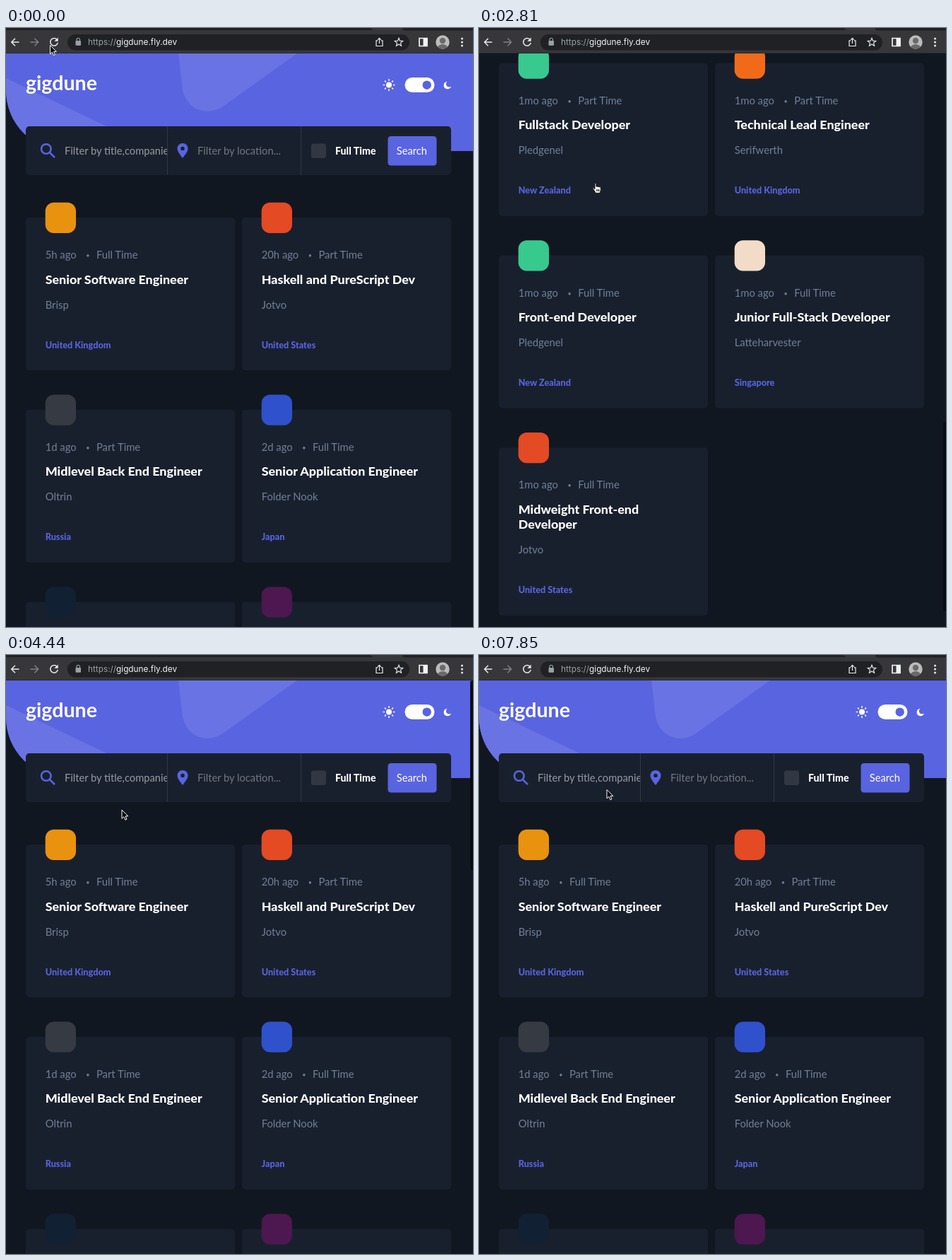
Recreate the animation shown at these times as an HTML page. Size 661x847 px, loop 8 s.

```html
<!DOCTYPE html>
<html lang="en">
<head>
<meta charset="utf-8">
<title>Job board</title>
<style>
  html, body { margin: 0; width: 100%; height: 100%; overflow: hidden; background: #121721; }
  svg { display: block; width: 661px; height: 847px; font-family: Lato, "Open Sans", sans-serif; }
  svg { --bg: #111720; --card: #19202d; --title: #fff; --box: #323843; --hint: #72777f; --typed: #969aa0; }
  svg.light { --bg: #f4f6f8; --card: #fff; --title: #19202d; --box: #e8e9ea; --hint: #8c9096; --typed: #8c9096; }
  .bg { fill: var(--bg); }
  .card { fill: var(--card); }
  .meta { font-size: 14.8px; fill: #6e8098; }
  .title { font-size: 17.9px; font-weight: 800; fill: var(--title); }
  .place { font-size: 12.7px; font-weight: 800; fill: #5964e0; }
  .field { font-size: 14.7px; }
  .violet { fill: #5964e0; }
  .tint { fill: #6973e3; }
  .rule { stroke: #6e8098; stroke-opacity: .25; }
  .line { fill: none; stroke: #e8eaed; stroke-width: 1.5; }
  .url { font: 11.8px Inter, Roboto, sans-serif; }
</style>
</head>
<body>
<svg id="stage" viewBox="0 0 661 847">
  <defs>
    <clipPath id="fieldClip"><rect x="80" y="140" width="148" height="67"/></clipPath>
    <clipPath id="faceClip"><circle cx="618" cy="20" r="9.7"/></clipPath>
  </defs>
  <rect class="bg" width="661" height="847"/>

  <g id="page">
    <path class="violet" d="M0 -60H661V174H86A86 86 0 0 1 0 88Z"/>
    <path class="tint" d="M244 36L249.500 84C253 114 283 128 309 109.500L412 36Z"/>
    <path class="tint" d="M0 71L180 157V174H86A86 86 0 0 1 0 88Z"/>
    <text x="28" y="88" font-size="28.6" font-weight="700" fill="#fff">gigdune</text>

    <g id="sun" fill="#fff" stroke="#fff" stroke-width="1.7" stroke-linecap="round">
      <circle cx="542" cy="80.500" r="4" stroke="none"/>
    </g>
    <rect x="564.500" y="70" width="42" height="21" rx="10.500" fill="#fff"/>
    <circle id="knob" cy="80.700" r="6.200"/>
    <path d="M624.500 75.700A5.300 5.300 0 1 0 630 82.600A4.200 4.200 0 0 1 624.500 75.700Z" fill="#fff"/>

    <rect class="card" x="28" y="139" width="602" height="69" rx="5"/>
    <path class="rule" d="M228.500 139V208M417.500 139V208"/>
    <g fill="none" stroke="#5964e0" stroke-width="2.600">
      <circle cx="56.800" cy="171" r="6.800"/>
      <path d="M61.800 176L69 183.200"/>
    </g>
    <path class="violet" fill-rule="evenodd" d="M250 163C245.500 163 242.500 166.500 242.500 170.500C242.500 175 246.500 179 250 184C253.500 179 257.500 175 257.500 170.500C257.500 166.500 254.500 163 250 163ZM250 167.700A2.700 2.700 0 1 1 250 173.100A2.700 2.700 0 1 1 250 167.700Z"/>
    <g class="field">
      <g clip-path="url(#fieldClip)"><text x="83" y="179" fill="var(--typed)">Filter by title,companies...</text></g>
      <text x="271" y="179" fill="var(--hint)">Filter by location...</text>
      <rect x="432" y="163.500" width="21" height="20.500" rx="3" fill="var(--box)"/>
      <text x="466" y="179" font-size="14.200" font-weight="800" fill="var(--title)">Full Time</text>
      <rect class="violet" x="540.500" y="153" width="69" height="41.500" rx="4.300"/>
      <text x="552.800" y="179" fill="#fff">Search</text>
    </g>
    <g id="cards"></g>
  </g>

  <rect id="thumb" x="657" width="6" height="268" rx="3" fill="#080b10"/>

  <g id="toolbar">
    <rect width="661" height="36" fill="#37373a"/>
    <path d="M0 0H514Q518 0 519 3H0ZM561 0H661V3.500H565Q561 3.500 561 0Z" fill="#202124"/>
    <path d="M0 35.500H661" stroke="#29292c"/>
    <rect x="87" y="9" width="484" height="22.500" rx="11.200" fill="#202124"/>
    <path class="line" d="M18.500 20H8M13 14.800L7.800 20L13 25.200"/>
    <path class="line" style="stroke:#808184" d="M34.500 20H45.500M40.500 14.800L45.700 20L40.500 25.200"/>
    <path class="line" d="M72 16.200A5.300 5.300 0 1 0 73.300 20.800"/>
    <path d="M73.700 13.500V18.800H68.400Z" fill="#e8eaed"/>
    <g fill="#9aa0a6">
      <rect x="98.500" y="18" width="7.500" height="6.800" rx="1"/>
      <path d="M100 18V16.500A2.250 2.250 0 0 1 104.500 16.500V18" fill="none" stroke="#9aa0a6" stroke-width="1.200"/>
    </g>
    <text class="url" x="116" y="24" fill="#9aa0a6">https://<tspan fill="#f1f3f4">gigdune.fly.dev</tspan></text>
    <path class="line" style="stroke-width:1.200" d="M526 17.800H524V25.500H533V17.800H531M528.500 22V14.500M526 16.800L528.500 14.300L531 16.800"/>
    <path id="star" class="line" style="stroke-width:1.200"/>
    <path d="M585 14.500H596V25.500H585Z" fill="none" stroke="#f1f3f4" stroke-width="1.700"/>
    <rect x="590.500" y="14" width="6" height="12" fill="#f1f3f4"/>
    <g clip-path="url(#faceClip)">
      <rect x="608" y="10" width="20" height="20" fill="#bcbcbc"/>
      <circle cx="618" cy="18" r="4.200" fill="#6a6a6a"/>
      <ellipse cx="618" cy="29" rx="7.500" ry="6" fill="#6a6a6a"/>
    </g>
    <g fill="#e8eaed"><circle cx="645.500" cy="15" r="1.500"/><circle cx="645.500" cy="20" r="1.500"/><circle cx="645.500" cy="25" r="1.500"/></g>
  </g>

  <g id="cursor" stroke-linejoin="round">
    <path id="arrow" d="M0 0V12.300L2.900 9.700L4.900 14.200L6.900 13.300L5 8.900H8.800Z" fill="#000" stroke="#fff"/>
    <path id="hand" transform="translate(-1 0)" d="M1 8.800C-1.800 6 -2.300 6.600 -2 7.500L.8 12L2 14.300H8L9.300 10.500V6.800Q8.500 5.300 7.300 6Q6.500 4.800 5 5.600Q4.200 4.500 2.900 5.200V1.300Q2 -.5 1 1.300ZM3.700 9V12M5.400 9V12M7 9V12" fill="#fff" stroke="#111" stroke-width=".9"/>
  </g>
</svg>

<script>
const LOOP = 8000;
const STEP = 150;
const ROW = 271.8;
const VIEW = 811, PAGE = 2457;
const $ = id => document.getElementById(id);

// tile colour, age, contract, title, company, place
const jobs = [
  ['#e99210', '5h', 'Full Time', 'Senior Software Engineer', 'Brisp', 'United Kingdom'],
  ['#e44a24', '20h', 'Part Time', 'Haskell and PureScript Dev', 'Jotvo', 'United States'],
  ['#363a43', '1d', 'Part Time', 'Midlevel Back End Engineer', 'Oltrin', 'Russia'],
  ['#2f51cc', '2d', 'Full Time', 'Senior Application Engineer', 'Folder Nook', 'Japan'],
  ['#122033', '2d', 'Part Time', 'Remote DevOps Engineer', 'Zib', 'Japan'],
  ['#4d174f', '4d', 'Part Time', 'Desktop Support Manager', 'Inkvella', 'Germany'],
  ['#4720bd', '1w', 'Full Time', 'iOS Engineer', 'Mellanto', 'United States'],
  ['#204482', '1w', 'Full Time', 'Senior EJB Developer', 'Frobe', 'United Kingdom'],
  ['#f2dcc8', '1w', 'Part Time', 'Senior Frontend Developer', 'Latteharvester', 'Singapore'],
  ['#202020', '2w', 'Freelance', 'App &amp; Website Designer', 'Finchwright', 'United States'],
  ['#38c98f', '1mo', 'Part Time', 'Fullstack Developer', 'Pledgenel', 'New Zealand'],
  ['#f16a1a', '1mo', 'Part Time', 'Technical Lead Engineer', 'Serifwerth', 'United Kingdom'],
  ['#38c98f', '1mo', 'Full Time', 'Front-end Developer', 'Pledgenel', 'New Zealand'],
  ['#f2dcc8', '1mo', 'Full Time', 'Junior Full-Stack Developer', 'Latteharvester', 'Singapore'],
  ['#e44a24', '1mo', 'Full Time', 'Midweight Front-end|Developer', 'Jotvo', 'United States']
];

function card([tile, age, contract, title, company, place], i) {
  const lines = title.split('|');
  const extra = (lines.length - 1) * 21.5;
  const x = i % 2 ? 334 : 28;
  const y = 268 + Math.floor(i / 2) * ROW;
  const text = (kind, top, s) => `<text class="${kind}" x="27.700" y="${top}">${s}</text>`;
  return `<g transform="translate(${x} ${y})">
    <rect class="card" width="296" height="${216 + extra}" rx="5"/>
    <rect x="27.700" y="-21.300" width="43.300" height="43.300" rx="12" fill="${tile}"/>
    ${text('meta', 58, `${age} ago<tspan dx="13.500" dy="-1" font-size="9">•</tspan><tspan dx="9.500" dy="1">${contract}</tspan>`)}
    ${lines.map((s, n) => text('title', 93.7 + n * 21.5, s)).join('')}
    ${text('meta', 128.7 + extra, company)}
    ${text('place', 184.7 + extra, place)}
  </g>`;
}

$('cards').innerHTML = jobs.map(card).join('');

$('sun').innerHTML += Array.from({ length: 8 }, (_, i) =>
  `<path d="M6.600 0H7.700" transform="translate(542 80.500) rotate(${i * 45})"/>`).join('');

$('star').setAttribute('d', 'M' + Array.from({ length: 10 }, (_, i) => {
  const a = i * Math.PI / 5, r = i % 2 ? 2.7 : 6;
  return `${556 + r * Math.sin(a)} ${20.3 - r * Math.cos(a)}`;
}).join('L') + 'Z');

// [time, value...]
const scrollTrack = [
  [700, 0], [900, 160], [1170, 540], [1320, 640], [1460, 700], [1760, 900], [2060, 1177.3],
  [2360, 1370], [2810, 1577.3], [3110, 1646], [3260, 1646], [3540, 1150], [3690, 620],
  [3840, 150], [3990, 18.5], [4140, 3], [4300, 0]
];
const cursorTrack = [
  [300, 62.5, 24.5], [750, 164, 218], [1900, 164, 219], [4700, 164, 219], [5180, 560, 96],
  [5330, 577, 86.5], [5910, 577, 86.5], [6210, 583, 88], [7110, 583, 88], [7400, 420, 120], [7850, 181, 190.5]
];
// runs of evenly spaced screen refreshes: [first, last]
const runs = [
  [0, 0], [300, 1050], [1170, 1320], [1460, 2360], [2510, 3410], [3540, 3540], [3690, 4590],
  [4740, 5190], [5330, 5330], [5620, 5770], [6060, 6210], [7110, 7710], [7850, 7850]
];

function refreshTime(t) {
  const [first, last] = runs.filter(r => t >= r[0]).pop();
  return Math.min(last, first + STEP * Math.floor((t - first) / STEP));
}

function sample(track, t) {
  const n = track.findIndex(p => p[0] > t);
  if (n === 0) return track[0].slice(1);
  if (n < 0) return track[track.length - 1].slice(1);
  const a = track[n - 1], b = track[n];
  const u = (t - a[0]) / (b[0] - a[0]);
  return a.slice(1).map((v, i) => v + (b[i + 1] - v) * u);
}

function draw(ms) {
  const t = refreshTime(ms);
  const [scroll] = sample(scrollTrack, t);
  const [x, y] = sample(cursorTrack, t);
  const light = t >= 5620 && t < 7110;
  const overToggle = x > 563 && x < 607 && y > 70 && y < 91;
  const overCard = t > 1400 && t < 4140;

  $('stage').setAttribute('class', light ? 'light' : '');
  $('page').setAttribute('transform', `translate(0 ${-scroll})`);

  $('thumb').setAttribute('y', 36 + scroll * VIEW / PAGE);
  $('thumb').setAttribute('opacity', t < 740 ? 0 : Math.max(0, Math.min(1, (5100 - t) / 400)));

  $('knob').setAttribute('cx', light ? 575.5 : 595.7);
  $('knob').setAttribute('fill', overToggle ? '#939bf4' : '#5964e0');

  const hand = overToggle || overCard;
  $('cursor').setAttribute('transform', `translate(${x} ${y})`);
  $('hand').style.display = hand ? '' : 'none';
  $('arrow').style.display = hand ? 'none' : '';
}

const start = performance.now();
function tick() {
  draw((performance.now() - start) % LOOP);
  requestAnimationFrame(tick);
}
tick();
</script>
</body>
</html>
```
